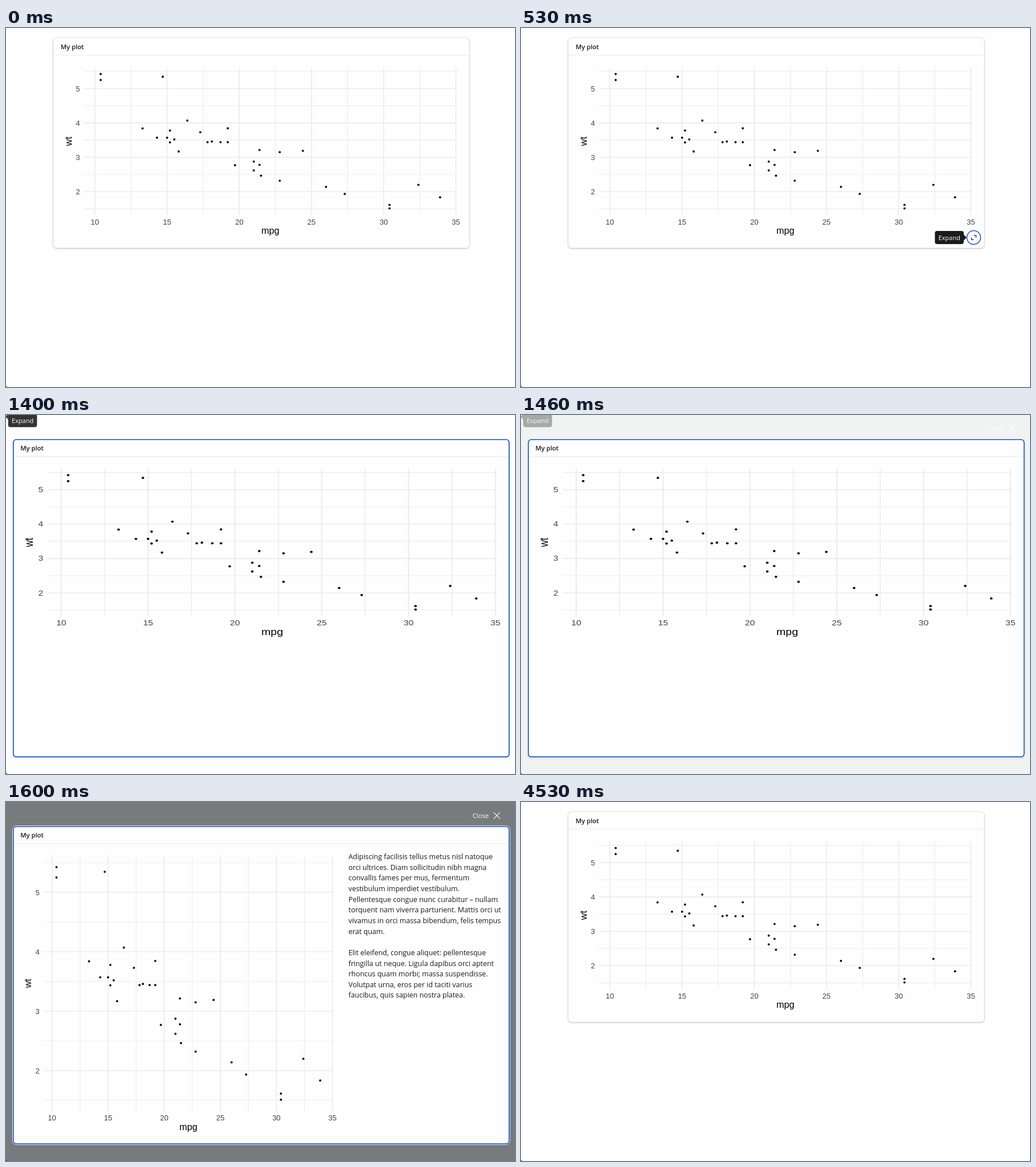
Write an HTML page that moves like this. It is 891x628 px and loops after 4960 ms.

```html
<!DOCTYPE html>
<html lang="en">
<head>
<meta charset="utf-8">
<title>Expanding plot card</title>
<style>
  html, body { margin: 0; width: 100%; height: 100%; overflow: hidden; background: #fefefe; }
  svg { display: block; width: 891px; height: 628px; }
  text { font-family: "Open Sans", "Noto Sans", sans-serif; fill: #1a1a1a; }
  .plot text { font-family: "Liberation Sans", Arial, sans-serif; }
  .plot .tick { font-size: 13px; fill: #424242; }
  .plot .axis { font-size: 16.2px; fill: #000; text-anchor: middle; }
  .middle { text-anchor: middle; }
  .end { text-anchor: end; }
  .card { fill: #fefefe; stroke: rgba(0, 0, 0, .09); filter: drop-shadow(0 1px 1.5px rgba(0, 0, 0, .2)); }
  .title { font-size: 11.2px; font-weight: 600; }
  .prose { font-size: 12.43px; }
  .tip { font-size: 11px; fill: #fff; }
  .close { font-size: 11.2px; fill: #fff; }
  .line { fill: none; }
</style>
</head>
<body>
<script>
const LOOP = 4960;
const BLUE = '#1652c8', DARK = '#1c1c1c', GRID = '#ebebeb';

const CARS = [
  [21, 2.62], [21, 2.875], [22.8, 2.32], [21.4, 3.215], [18.7, 3.44], [18.1, 3.46], [14.3, 3.57], [24.4, 3.19],
  [22.8, 3.15], [19.2, 3.44], [17.8, 3.44], [16.4, 4.07], [17.3, 3.73], [15.2, 3.78], [10.4, 5.25], [10.4, 5.424],
  [14.7, 5.345], [32.4, 2.2], [30.4, 1.615], [33.9, 1.835], [21.5, 2.465], [15.5, 3.52], [15.2, 3.435], [13.3, 3.84],
  [19.2, 3.845], [27.3, 1.935], [26, 2.14], [30.4, 1.513], [15.8, 3.17], [19.7, 2.77], [15, 3.57], [21.4, 2.78]
];

const PROSE = [
  'Adipiscing facilisis tellus metus nisl natoque',
  'orci ultrices. Diam sollicitudin nibh magna',
  'convallis fames per mus, fermentum',
  'vestibulum imperdiet vestibulum.',
  'Pellentesque congue nunc curabitur – nullam',
  'torquent nam viverra parturient. Mattis orci ut',
  'vivamus in orci massa bibendum, felis tempus',
  'erat quam.',
  '',
  'Elit eleifend, congue aliquet: pellentesque',
  'fringilla ut neque. Ligula dapibus orci aptent',
  'rhoncus quam morbi; massa suspendisse.',
  'Volutpat urna, eros per id taciti varius',
  'faucibus, quis sapien nostra platea.'
];

function add(parent, tag, attrs = {}, content) {
  const el = document.createElementNS('http://www.w3.org/2000/svg', tag);
  for (const key in attrs) el.setAttribute(key, attrs[key]);
  if (content !== undefined) el.textContent = content;
  return parent.appendChild(el);
}
const group = (parent, attrs) => add(parent, 'g', attrs);
const text = (parent, x, y, cls, content, more) => add(parent, 'text', { x, y, class: cls, ...more }, content);
const path = (parent, d, stroke, width) =>
  add(parent, 'path', { d, class: 'line', stroke, 'stroke-width': width });
const box = (parent, x, y, width, height, rx, more) => add(parent, 'rect', { x, y, width, height, rx, ...more });

// Opacity over one loop, from [ms, value] steps.
function fade(el, steps, hard) {
  const frames = [[0, steps[0][1]], ...steps, [LOOP, steps[steps.length - 1][1]]]
    .map(([ms, opacity]) => ({ offset: ms / LOOP, opacity, easing: hard ? 'steps(1, end)' : 'linear' }));
  el.animate(frames, { duration: LOOP, iterations: Infinity });
}
const show = (el, from, to) => fade(el, [[0, 0], [from, 1], [to, 0]], true);

// Scatter plot: x10 and y5 locate the values 10 and 5, kx and ky are pixels per unit.
function plot(parent, x10, kx, y5, ky, attrs) {
  const g = group(parent, { class: 'plot', ...attrs });
  const px = v => x10 + (v - 10) * kx;
  const py = v => y5 + (5 - v) * ky;
  const left = px(9.225), right = px(35.075), top = py(5.62), bottom = py(1.317);
  const vertical = (v, w) => path(g, `M${px(v)} ${top}V${bottom}`, GRID, w);
  const horizontal = (v, w) => path(g, `M${left} ${py(v)}H${right}`, GRID, w);

  for (let v = 12.5; v < 35; v += 5) vertical(v, 1.1);
  for (let v = 1.5; v < 6; v++) horizontal(v, 1.1);
  for (let v = 10; v <= 35; v += 5) {
    vertical(v, 1.6);
    text(g, px(v), bottom + 16.2, 'tick middle', v);
  }
  for (let v = 2; v <= 5; v++) {
    horizontal(v, 1.6);
    text(g, left - 6.6, py(v) + 4.6, 'tick end', v);
  }
  for (const [mpg, wt] of CARS) add(g, 'circle', { cx: px(mpg), cy: py(wt), r: 1.9 });

  text(g, (left + right) / 2, bottom + 33, 'axis', 'mpg');
  text(g, 0, 0, 'axis', 'wt', { transform: `translate(${left - 21.4} ${(top + bottom) / 2}) rotate(-90)` });
  return g;
}

function card(parent, x, y, w, h) {
  box(parent, x, y, w, h, 6, { class: 'card' });
  path(parent, `M${x + .5} ${y + 30.5}H${x + w - .5}`, '#ececec', 1);
  text(parent, x + 13.2, y + 20, 'title', 'My plot');
}

// Tooltip body with its left edge at x and its middle at y; tip is the arrow's reach.
function tooltip(parent, x, y, tip) {
  const g = group(parent);
  const edge = tip > 0 ? x + 50.5 : x;
  const arrowY = tip > 0 ? y : 3;
  box(g, x, y - 11.5, 50.5, 23, 4, { fill: DARK });
  add(g, 'path', { d: `M${edge} ${arrowY - 5}L${edge + tip} ${arrowY}L${edge} ${arrowY + 5}Z`, fill: DARK });
  text(g, x + 25.3, y + 4, 'tip middle', 'Expand');
  return g;
}

function focusRing(parent, x, y, w, h, r) {
  const g = group(parent);
  box(g, x - .5, y - .5, w + 1, h + 1, r + .5, { class: 'line', stroke: '#fff' });
  box(g, x + .8, y + .8, w - 1.6, h - 1.6, r - .8, { class: 'line', stroke: BLUE, 'stroke-width': 1.7 });
  return g;
}

const stage = add(document.body, 'svg', { viewBox: '0 0 891 628' });
box(stage, 0, 0, 891, 628, 0, { fill: '#fefefe' });

// Page with the small card
const small = group(stage);
card(small, 82.5, 17, 728.5, 368);
plot(small, 155.6, 25.28, 106, 60.1);
fade(small, [[0, 1], [1360, 0], [4530, 1]], true);

const hover = group(stage);
tooltip(hover, 724.5, 366.5, 5);
add(hover, 'circle', { cx: 792.5, cy: 366.5, r: 12, fill: '#fefefe', stroke: BLUE, 'stroke-width': 1.5 });
path(hover, 'M792.7 362.8H796.6V366.8M788.5 366.4V370.4H792.4', DARK, 1.2);
fade(hover, [[0, 0], [360, 0], [360, .17], [530, 1], [1360, 1], [1360, 0]]);

// Full-screen view
const overlay = box(stage, 0, 0, 891, 628, 0, { fill: '#777b7e' });
fade(overlay, [[0, 0], [1400, 0], [1430, .03], [1460, .09], [1500, .3], [1530, .52], [1560, .76],
  [1600, 1], [4530, 1], [4530, 0]]);

const looseTip = tooltip(stage, 3.8, 9.8, -4.5);
fade(looseTip, [[0, 0], [1360, 0], [1360, 1], [1400, .9], [1430, .65], [1460, .35], [1500, .12], [1540, 0]]);

const full = group(stage);
text(full, 816.8, 28, 'close', 'Close');
path(full, 'M853.6 18.2L864.8 29.4M864.8 18.2L853.6 29.4', '#fff', 1.1);
card(full, 12, 42.2, 869.5, 556.8);
show(full, 1360, 4530);

const stretched = plot(full, 155.6, 25.28, 106, 60.1, { transform: 'matrix(1.2025 0 0 1 -90.4 24.7)' });
show(stretched, 1360, 1600);

const settled = group(full);
plot(settled, 80.5, 19.644, 158, 104);
PROSE.forEach((line, i) => text(settled, 599.5, 100 + i * 18.65, 'prose', line));
show(settled, 1600, 4530);

show(focusRing(full, 12, 42.2, 869.5, 556.8, 6), 1360, 3260);
show(focusRing(full, 816, 14.6, 51.8, 18.4, 2), 3260, 4530);

// Dark window corner
add(stage, 'path', { d: 'M0 625.5Q.4 627.6 2.5 628H0Z', fill: '#222' });
</script>
</body>
</html>
```
